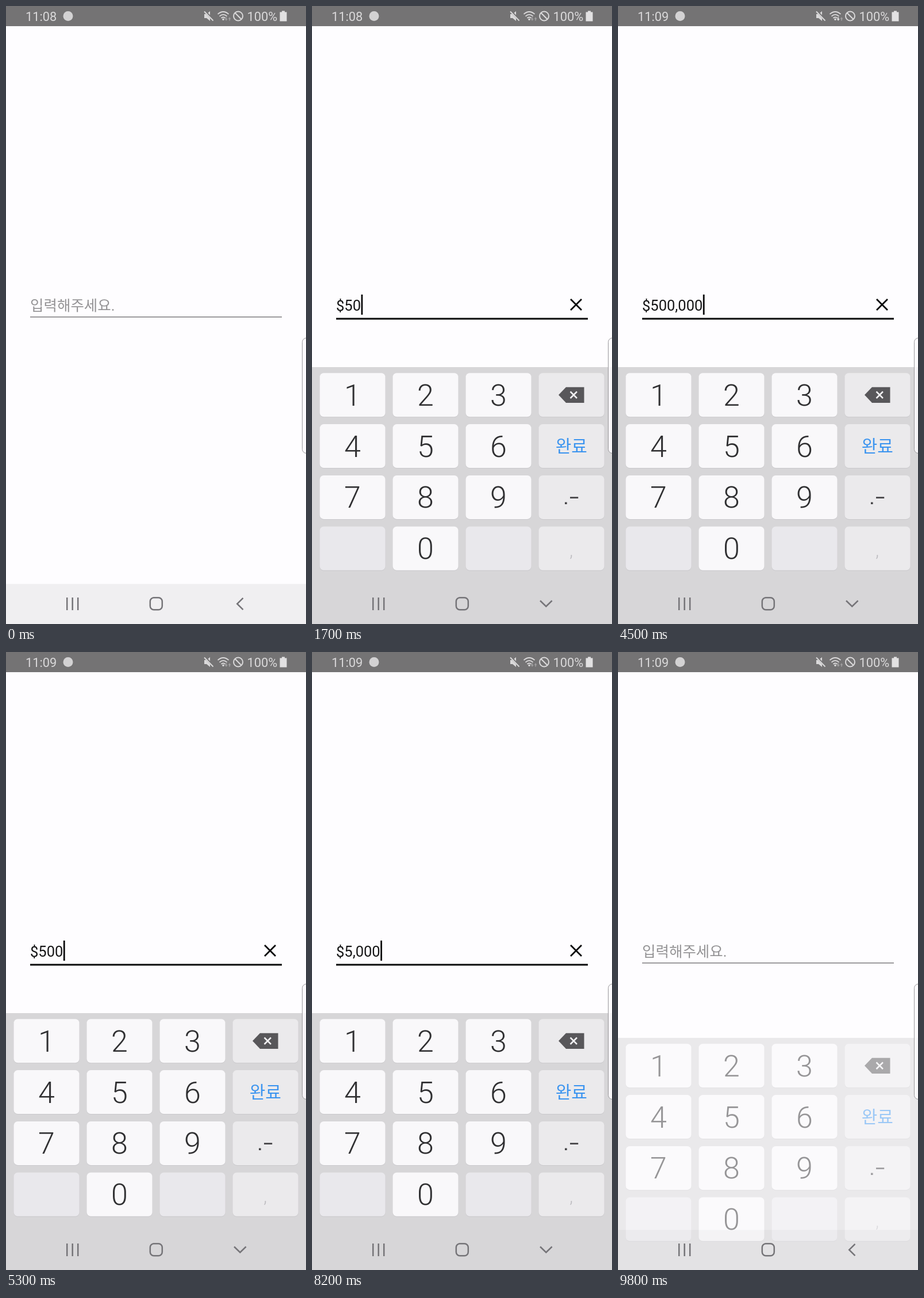
Write an HTML page that moves like this. It is 522 px wide and 1073 px high and loops after 9900 ms.

```html
<!DOCTYPE html>
<html lang="ko">
<head>
<meta charset="utf-8">
<title>Amount input</title>
<style>
  html, body { margin: 0; width: 100%; height: 100%; overflow: hidden; background: #fefdff; }
  svg { display: block; width: 522px; height: 1073px; }
  text { font-family: Roboto, "Noto Sans CJK KR", "Noto Sans CJK", sans-serif; white-space: pre; }
  .status text { font-size: 21.8px; fill: #dad9da; }
  .field text { font-size: 25.5px; }
  .digit { font-size: 52px; font-weight: 300; fill: #303032; text-anchor: middle; }
  .done { font-size: 30px; fill: #3b94ef; text-anchor: middle; }
  .comma { font-size: 32px; font-weight: 300; fill: #bebdc1; text-anchor: middle; }
  .stroke { fill: none; stroke-linecap: butt; }
  .nav { stroke: #757478; stroke-width: 2.5; }
</style>
</head>
<body>
<svg viewBox="0 0 522 1073">
  <rect width="522" height="1073" fill="#fefdff"/>

  <g class="status">
    <rect width="522" height="35" fill="#747374"/>
    <text id="clock" x="34" y="26"></text>
    <circle cx="108" cy="17.5" r="8.5" fill="#d3d2d3"/>
    <path d="M345 14h4l6-5v17l-6-5h-4z" fill="#dad9da"/>
    <path class="stroke" d="M345.500 8.500L361 25" stroke="#747374" stroke-width="4"/>
    <path class="stroke" d="M345 9.500L360.500 25.500" stroke="#dad9da" stroke-width="1.900"/>
    <g class="stroke" stroke="#dad9da" stroke-width="1.800">
      <path d="M368.500 14.200Q378 5.800 387.500 14.200M371.500 17.800Q378 12 384.500 17.800M374.500 21Q378 18 381.500 21"/>
      <circle cx="404" cy="17.500" r="8" stroke-width="2"/>
      <path d="M398.300 11.800L409.700 23.200" stroke-width="2"/>
    </g>
    <circle cx="378" cy="23.200" r="1.700" fill="#dad9da"/>
    <path id="down" d="M382.300 19.500h1.800v3h1.700l-2.600 3.300l-2.600-3.300h1.700z"/>
    <path d="M388.200 25.500h1.600v-3h1.500l-2.300-3.200l-2.300 3.200h1.500z" fill="#a09fa0"/>
    <text x="419.500" y="26">100%</text>
    <path d="M480 8.500h5v2h3.500v16h-12v-16h3.500z" fill="#e2e1e2"/>
  </g>

  <g class="field">
    <text id="hint" x="42" y="528.500" fill="#949395">입력해주세요.</text>
    <text id="amount" x="42" y="528.500" fill="#151516"></text>
    <rect id="cursor" y="501" width="2.800" height="35" fill="#0a0a0b"/>
    <path id="clear" class="stroke" d="M450 509l19 19m0-19l-19 19" stroke="#0a0a0b" stroke-width="2.800"/>
    <rect id="line" x="42" width="438"/>
  </g>

  <rect y="1003.500" width="522" height="70" fill="#f0eff1"/>
  <g id="board">
    <rect y="627" width="522" height="446" fill="#d7d6d8"/>
    <g id="keys"></g>
    <path d="M429 675.200l13-13.500h31.500v27.300h-31.500z" fill="#58575a"/>
    <path class="stroke" d="M449.500 669.500l11.500 11.500m0-11.500l-11.500 11.500" stroke="#f1f0f2" stroke-width="2.500"/>
    <text class="done" x="451.300" y="775">완료</text>
    <path d="M440 861.500h3.600v3.600h-3.600zM449 852.300h14.200v2.800h-14.200z" fill="#454447"/>
    <text class="comma" x="451" y="956">,</text>
  </g>

  <g class="stroke nav">
    <path d="M106.200 1027v22m9.500-22v22m9.500-22v22"/>
    <rect x="250.800" y="1027.300" width="21" height="21" rx="6.500"/>
    <path id="back"/>
  </g>
  <rect x="515.500" y="576.500" width="30" height="200" rx="7" fill="#fefdff" fill-opacity=".82" stroke="#98979a"/>
</svg>

<script>
const LOOP = 9900, STEP = 100, BLINK = 500;
const FOCUS = 600, BLUR = 9600;
const $ = id => document.getElementById(id);
const set = (el, attrs) => { for (const k in attrs) el.setAttribute(k, attrs[k]); };

// [time, amount, key seen pressed just before]
const edits = [
  [1400, 5, '5'], [1700, 50, '0'], [2000, 500, '0'], [2300, 5e3, '0'],
  [2600, 5e4, '0'], [2900, 5e5], [3300, 5e6], [3600, 5e7],
  [4200, 5e6], [4400, 5e5, 'del'], [4700, 5e4, 'del'], [5000, 5e3, 'del'],
  [5300, 500, 'del'], [5600, 50], [5900, 5, 'del'], [6200, 0],
  [7000, 5, '5'], [7400, 50, '0'], [7900, 500], [8200, 5e3, '0'], [8900, 0]
];

// [time, keyboard offset, keyboard opacity]
const slide = [
  [0, 0, 0], [700, 100, .2], [800, 50, .5], [900, 18, .85], [1000, 4, 1], [1100, 0, 1],
  [9600, 2, .97], [9700, 15, .83], [9800, 43, .5]
];
const traffic = [[100, 600], [4500, 5100]];

const layout = ['1', '2', '3', 'del', '4', '5', '6', 'done', '7', '8', '9', 'sign', '', '0', '', 'comma'];
const keys = {};

function add(tag, attrs, text = '') {
  const el = document.createElementNS('http://www.w3.org/2000/svg', tag);
  set(el, attrs);
  el.textContent = text;
  return $('keys').appendChild(el);
}

layout.forEach((name, i) => {
  const x = 13.5 + i % 4 * 127, y = 637.3 + Math.floor(i / 4) * 88.8;
  const isDigit = name.length === 1;
  const fill = isDigit ? '#f9f8fa' : name ? '#ebeaec' : '#e9e8ec';
  const box = { x, y, width: 114, height: 76, rx: 7 };
  add('rect', { ...box, y: y + 1, fill: '#c9c8cb' });
  const el = add('rect', { ...box, fill });
  if (name) keys[name] = { el, fill };
  if (isDigit) add('text', { class: 'digit', x: x + 57, y: y + 56.5 }, name);
});

const latest = (table, t) => table.filter(row => row[0] <= t).pop();

function draw(t) {
  const focused = t >= FOCUS && t < BLUR;
  const [since, amount] = latest(edits, t) || [FOCUS, 0];
  const press = edits.find(([at, , key]) => key && t >= at - STEP && t < at);
  const [, offset, opacity] = latest(slide, t);
  const busy = traffic.some(([from, to]) => t >= from && t < to);

  $('clock').textContent = t < 4500 ? '11:08' : '11:09';
  set($('down'), { fill: busy ? '#e2e1e2' : '#a09fa0' });

  const label = $('amount');
  label.textContent = amount ? '$' + amount.toLocaleString('en-US') : '';
  set($('hint'), { visibility: amount ? 'hidden' : 'visible' });
  set($('clear'), { visibility: amount ? 'visible' : 'hidden' });
  const lit = focused && Math.floor((t - since) / BLINK) % 2 === 0;
  set($('cursor'), {
    x: 42.5 + (amount ? label.getComputedTextLength() : 0),
    visibility: lit ? 'visible' : 'hidden'
  });
  set($('line'), focused
    ? { y: amount ? 541.5 : 539, height: 3, fill: '#0a0a0b' }
    : { y: 539.2, height: 1.5, fill: '#7c7b7d' });

  for (const name in keys) {
    const { el, fill } = keys[name];
    set(el, { fill: press && press[2] === name ? '#cbcacd' : fill });
  }
  set($('board'), { transform: `translate(0 ${offset})`, opacity });
  set($('back'), {
    d: t >= 900 && t < BLUR ? 'M397 1032.500l10.300 10l10.300-10' : 'M412.500 1027.800l-10.300 10.200l10.300 10.200'
  });
}

const start = performance.now();
function tick(now) {
  const t = Math.max(0, now - start) % LOOP;
  draw(Math.floor(t / STEP) * STEP);
  requestAnimationFrame(tick);
}
draw(0);
requestAnimationFrame(tick);
</script>
</body>
</html>
```
